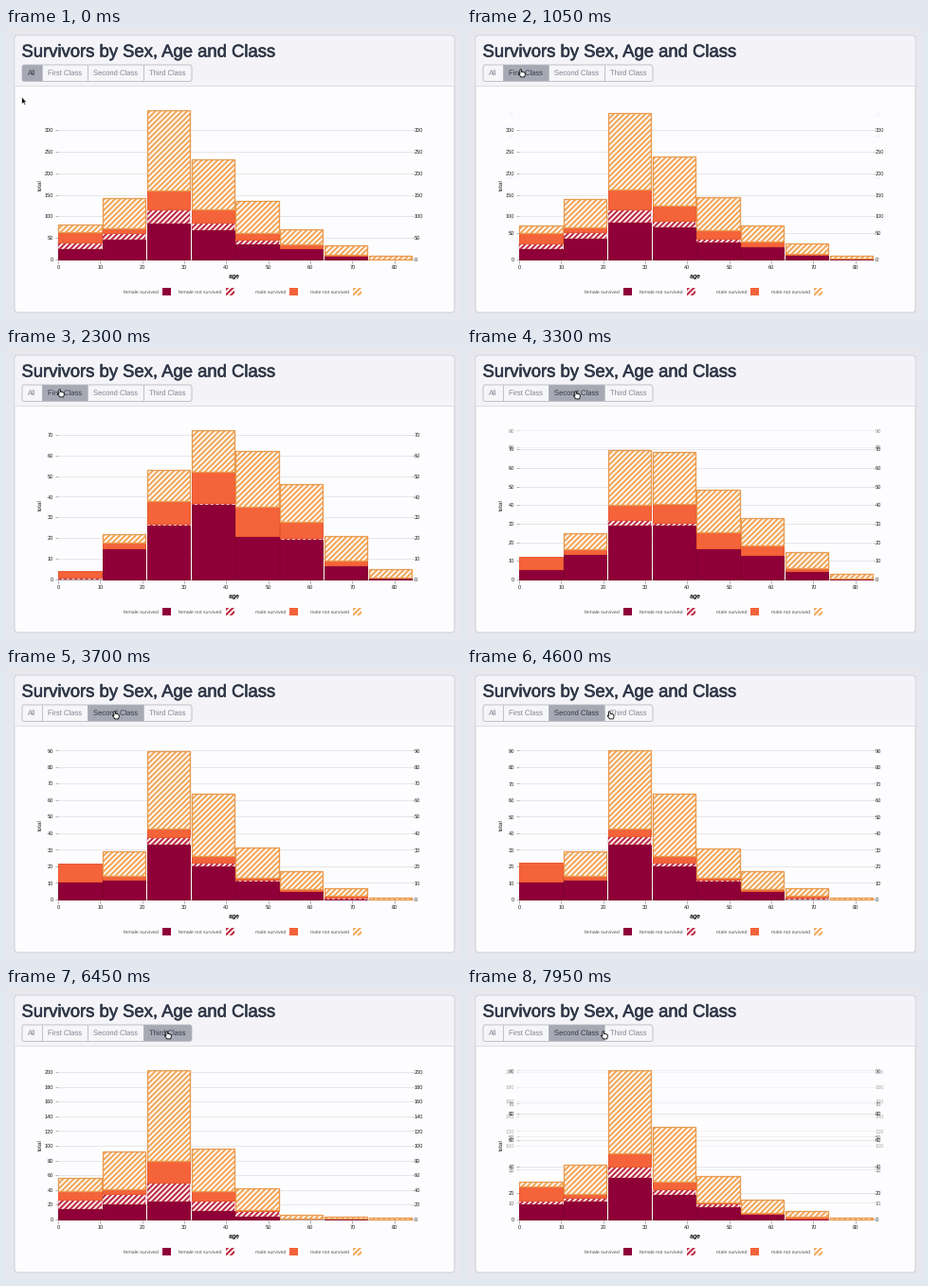
Animation of 480x309 px, one loop 8 s. Source, as a matplotlib script:

```python
import numpy as np
import matplotlib.pyplot as plt
from matplotlib.animation import FuncAnimation
from matplotlib.collections import LineCollection
from matplotlib.colors import to_rgb
from matplotlib.patches import FancyBboxPatch, PathPatch, Polygon, Rectangle
from matplotlib.path import Path
import matplotlib.patheffects as pe

W, H = 480, 309
STEP, FRAMES = 50, 160
plt.rcParams.update({"font.family": "Liberation Sans", "text.hinting": "none"})

# Rows are age bins; columns: female survived / not, male survived / not
FIRST = [(0, 1, 3, 0), (15, 0, 3, 4), (26, 1, 11, 15), (36, 1, 15, 20),
         (21, 0, 14, 27), (19, 1, 8, 18), (7, 0, 2, 12), (1, 0, 0, 4)]
SECOND = [(11, 0, 11, 0), (12, 0, 2, 15), (33, 5, 5, 47), (20, 2, 4, 38),
          (11, 1, 1, 18), (5, 0, 1, 11), (0, 1, 1, 5), (0, 0, 0, 1)]
THIRD = [(14, 13, 11, 18), (20, 15, 6, 51), (24, 26, 29, 123), (12, 14, 13, 57),
         (4, 8, 1, 29), (0, 1, 0, 6), (1, 0, 0, 3), (0, 0, 0, 2)]
CLASSES = [np.array(c, float) for c in (FIRST, SECOND, THIRD)]
DATA = [sum(CLASSES)] + CLASSES
TICK_STEP = [50, 10, 10, 20]

LEFT, RIGHT, TOP, BASE = 55, 429, 87.5, 245
PITCH = (RIGHT - LEFT) / 8
PEAK = [d.sum(axis=1).max() for d in DATA]
SCALE = [(BASE - TOP) / m for m in PEAK]
TICKS = [list(range(0, int(m) + 1, s)) for m, s in zip(PEAK, TICK_STEP)]

# (time, selected button), each followed by a one second transition
CLICKS = [(800, 1), (2800, 2), (5100, 3), (7400, 2)]
# (start, end, x, y) cursor moves
MOVES = [(0, 800, 58, 48), (2300, 2750, 116, 50),
         (4300, 4800, 171, 50), (7200, 7400, 145, 50)]

INK, GREY = "#2f3848", "#80858f"
FILL = ["#8f0039", "#ffffff", "#f4633a", "#ffffff"]
EDGE = ["#86002f", "#bf2f47", "#e9592f", "#e99a4e"]
EDGE_W = [1.0, 0.4, 1.0, 1.3]
STRIPE = {1: "#bf2f47", 3: "#f2a95f"}

fig = plt.figure(figsize=((W + .01) / 72, (H + .01) / 72), dpi=72, facecolor="#e7e8ee")
ax = fig.add_axes([0, 0, 1, 1])
ax.set_xlim(0, W)
ax.set_ylim(H, 0)
ax.axis("off")


def label(x, y, s, size, color="#222222", ha="center", z=6, bold=0, **kw):
    t = ax.text(x, y + .36 * size, s, fontsize=size, color=color, ha=ha,
                va="baseline", zorder=z, **kw)
    if bold:
        t.set_path_effects([pe.Stroke(linewidth=bold, foreground=color), pe.Normal()])
    return t


def line(xs, ys, color, lw=.6, z=2):
    return ax.plot(xs, ys, color=color, lw=lw, zorder=z, solid_capstyle="butt")[0]


def rounded(x0, y0, x1, y1, r, **kw):
    box = FancyBboxPatch((x0, y0), x1 - x0, y1 - y0,
                         boxstyle=f"round,pad=0,rounding_size={r}", **kw)
    return ax.add_patch(box)


def rect_path(rects):
    verts, codes = [], []
    for x, y, w, h in rects:
        verts += [(x, y), (x + w, y), (x + w, y + h), (x, y + h), (x, y)]
        codes += [Path.MOVETO] + [Path.LINETO] * 3 + [Path.CLOSEPOLY]
    if not verts:
        return Path([(0, 0), (0, 0)])
    return Path(verts, codes)


def stripes(color, y0, y1, z):
    segs = [[(c - y0, y0), (c - y1, y1)] for c in np.arange(100, 760, 5.6)]
    return ax.add_collection(LineCollection(segs, colors=color, linewidths=2.2, zorder=z),
                             autolim=False)


# Card and heading
rounded(9, 8, 473, 301, 3, fc="#fdfdff", ec="#cdced5", lw=1, zorder=0)
head = rounded(9.5, 8.5, 472.5, 70, 3, fc="#f4f4f8", ec="none", zorder=.1)
head.set_clip_path(Rectangle((9, 8), 464, 53, transform=ax.transData))
line([9, 473], [61, 61], "#d6d7dd", .8, 1)
label(16.5, 23.8, "Survivors by Sex, Age and Class", 18.45, INK, "left", bold=.6)

# Button group
EDGES = [17, 38, 86, 144.5, 196]
NAMES = ["All", "First Class", "Second Class", "Third Class"]
group = rounded(17, 39, 196, 56.5, 2.5, fc="#f6f6f9", ec="none", zorder=2)
buttons, captions = [], []
for x0, x1, name in zip(EDGES, EDGES[1:], NAMES):
    b = ax.add_patch(Rectangle((x0, 39), x1 - x0, 17.5, lw=0, zorder=2.1))
    b.set_clip_path(group)
    buttons.append(b)
    captions.append(label((x0 + x1) / 2, 47.6, name, 7.6))
for x in EDGES[1:-1]:
    line([x, x], [39, 56.5], "#b3b6be", .8, 2.2)
rounded(17, 39, 196, 56.5, 2.5, fc="none", ec="#b3b6be", lw=.8, zorder=2.3)

# Fixed chart parts
line([LEFT, RIGHT], [BASE, BASE], "#999999", .7, 2)
for k in range(9):
    x = LEFT + 44.35 * k
    line([x, x], [246.3, 248.8], "#777777", .6, 2)
    label(x, 253, str(10 * k), 5.6)
label(240.5, 262.3, "age", 6.3, bold=.15)
ax.text(36, 166, "total", fontsize=6.3, color="#222222", rotation=90,
        ha="center", va="center", zorder=6)

LEGEND = ["female survived", "female not survived", "male survived", "male not survived"]
for k, name in enumerate(LEGEND):
    x = 161 + 67 * k
    label(x, 279.2, name, 5.3, "#555555", "right")
    sw = ax.add_patch(Rectangle((x + 4, 275), 8.8, 8.4, fc=FILL[k], lw=0, zorder=3))
    if k in STRIPE:
        stripes(STRIPE[k], 270, 290, 3.1).set_clip_path(sw)

# One tick (grid line, marks, two labels) per value used by any scale
ticks = {}
for v in sorted(set(sum(TICKS, []))):
    ticks[v] = (
        [line([LEFT, RIGHT], [0, 0], "#dddde2", .7, 1.5),
         line([51.5, LEFT - .5], [0, 0], "#888888", .6, 1.6),
         line([RIGHT - .5, 429.8], [0, 0], "#888888", .6, 1.6)],
        [label(50.3, 0, str(v), 5.6, "#1c1c1c", "right"),
         label(431, 0, str(v), 5.6, "#1c1c1c", "left")])

# Stacked bars
bars, hatch = [], {}
for k in range(4):
    z = 3 + .2 * k
    if k in STRIPE:
        hatch[k] = stripes(STRIPE[k], 80, 250, z + .05)
    body = PathPatch(rect_path([]), fc=FILL[k], lw=0, zorder=z)
    rim = PathPatch(rect_path([]), fc="none", ec=EDGE[k], lw=EDGE_W[k],
                    joinstyle="miter", zorder=z + .1)
    bars.append((ax.add_patch(body), ax.add_patch(rim)))

# Cursors, drawn relative to their tip
ARROW = np.array([(0, 0), (0, 7.6), (1.7, 6.1), (2.9, 8.8), (4.1, 8.3),
                  (2.9, 5.7), (5.2, 5.6)])
HAND = np.array([(-.8, .3), (0, -.3), (.8, .3), (.9, 2.6), (2.2, 2.5), (3.4, 2.9),
                 (4.5, 3.5), (4.7, 5.2), (3.9, 7.9), (.2, 7.9), (-1.2, 6),
                 (-2.3, 4.6), (-1.7, 3.9), (-.8, 4.6)])
arrow = ax.add_patch(Polygon(ARROW, fc="#111111", ec="white", lw=.6, zorder=9))
hand = ax.add_patch(Polygon(HAND, fc="white", ec="#111111", lw=.9, zorder=9))


def clamp(u):
    return min(max(u, 0), 1)


def cubic(u):
    return 4 * u ** 3 if u < .5 else 1 - 4 * (1 - u) ** 3


def mix(a, b, p):
    return a + (b - a) * p


def state(t):
    """Old class, new class, time since the click."""
    old, new, since = 0, 0, 9999
    for start, sel in CLICKS:
        if t >= start:
            old, new, since = new, sel, t - start
    return old, new, since


def draw_buttons(old, new, since):
    p = clamp(since / 150)
    for k, (b, cap) in enumerate(zip(buttons, captions)):
        on = p if k == new else 1 - p if k == old else 0
        if k == new == old:
            on = 1
        blend = lambda a, c: tuple(mix(np.array(to_rgb(a)), np.array(to_rgb(c)), on))
        b.set_facecolor(blend("#f6f6f9", "#a6a9b4"))
        cap.set_color(blend(GREY, INK))


def draw_ticks(old, new, p):
    for v, (lines, texts) in ticks.items():
        was, now = v in TICKS[old], v in TICKS[new]
        y0, y1 = BASE - v * SCALE[old], BASE - v * SCALE[new]
        if was and now:
            y, alpha = mix(y0, y1, p), 1
        elif now:
            y, alpha = y1, p
        else:
            y, alpha = y0, (1 - p) if was else 0
        for ln in lines:
            ln.set_ydata([y, y])
            ln.set_alpha(alpha)
            ln.set_visible(alpha > .01)
        for tx in texts:
            tx.set_y(y + 2)
            tx.set_alpha(alpha)
            tx.set_visible(alpha > .01)


def draw_bars(old, new, p):
    size = mix(DATA[old] * SCALE[old], DATA[new] * SCALE[new], p)
    tops = BASE - np.cumsum(size, axis=1)
    for k, (body, rim) in enumerate(bars):
        rects = [(LEFT + PITCH * i + .3, tops[i, k], PITCH - 1.45, size[i, k])
                 for i in range(8) if size[i, k] > .05]
        path = rect_path(rects)
        body.set_path(path)
        rim.set_path(path)
        if k in hatch:
            hatch[k].set_clip_path(path, transform=ax.transData)


def draw_cursor(t):
    x, y = 18, 77
    for start, end, tx, ty in MOVES:
        u = clamp((t - start) / (end - start))
        u = u * u * (3 - 2 * u)
        x, y = mix(x, tx, u), mix(y, ty, u)
    tip = np.array([x - 1.3, y - 4])
    over = y - 4 < 56
    arrow.set_visible(not over)
    hand.set_visible(over)
    arrow.set_xy(ARROW + tip)
    hand.set_xy(HAND + tip)


def update(i):
    t = i * STEP
    old, new, since = state(t)
    p = cubic(clamp(since / 1000))
    draw_buttons(old, new, since)
    draw_ticks(old, new, p)
    draw_bars(old, new, p)
    draw_cursor(t)
    return []


anim = FuncAnimation(fig, update, frames=FRAMES, interval=STEP, repeat=True,
                     repeat_delay=0, init_func=lambda: update(0), blit=False)
plt.show()
```
